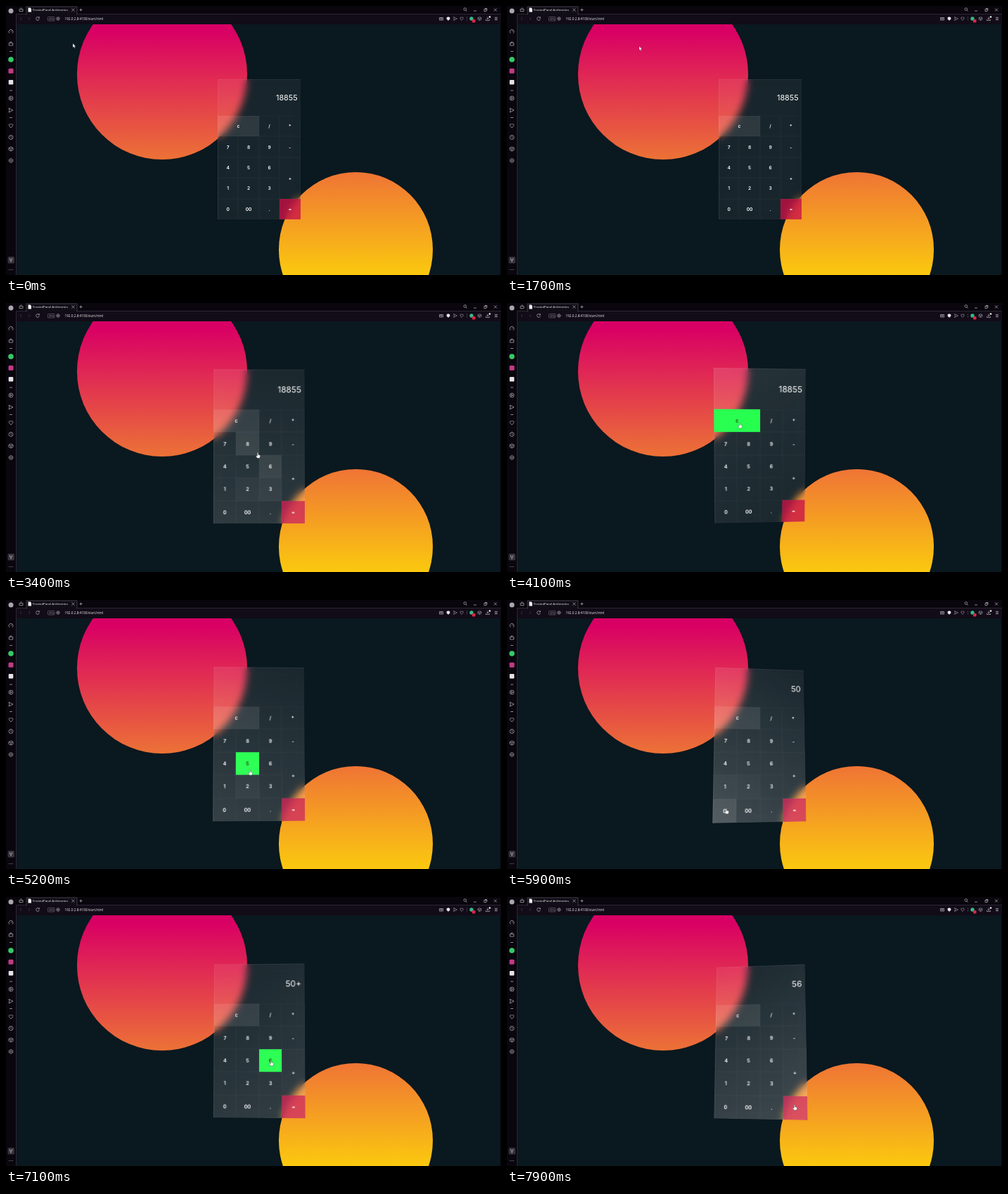
An HTML page for the animation above (8000 ms loop, 704x382 px).

```html
<!DOCTYPE html>
<html lang="en">
<head>
<meta charset="utf-8">
<title>Frosted glass keypad</title>
<style>
html, body { margin: 0; width: 100%; height: 100%; overflow: hidden; background: #09060d; }
body { position: relative; }
.page { position: absolute; left: 15px; top: 26px; width: 688px; height: 355.5px; background: #0a181f; overflow: hidden; }
.disc { position: absolute; border-radius: 50%; }
.pink { left: 86px; top: -50px; width: 241.6px; height: 241.6px; background: linear-gradient(#d60068, #d90064 25%, #ec7236); }
.gold { left: 372.8px; top: 210.2px; width: 219.5px; height: 219.5px; background: linear-gradient(#ef7435, #fbcb0e 68%, #ffec00); }
svg { position: absolute; left: 0; top: 0; }
.panel {
  position: absolute; left: 300.5px; top: 104.4px; width: 117.6px; height: 199px; overflow: hidden;
  background: rgba(255,255,255,.06); backdrop-filter: blur(5.4px);
  box-shadow: inset .5px .5px 0 rgba(255,255,255,.12);
  font-family: Inter, sans-serif; color: #fff;
}
.display { position: absolute; right: 4px; top: .8px; height: 52px; line-height: 52px; font-size: 10.8px; }
.key {
  position: absolute; box-sizing: border-box; padding-top: 1px;
  display: flex; align-items: center; justify-content: center;
  font-size: 6.6px; font-weight: 600; box-shadow: inset 0 0 0 .5px rgba(255,255,255,.045);
}
.glare {
  position: absolute; left: 50%; top: 50%; width: 236px; height: 236px; margin: -118px;
  background: linear-gradient(0deg, rgba(255,255,255,0), #fff);
}
</style>
</head>
<body>
<div class="page"><div class="disc pink"></div><div class="disc gold"></div></div>

<svg width="704" height="382" font-family="Open Sans, sans-serif">
  <path d="M15 12H704V26H15Z" fill="#110c17"/>
  <path d="M14.500 382V11.500H704" fill="none" stroke="#2c2633"/>
  <path d="M29 12.500V1H101V12.500" fill="#120e18" stroke="#55505c" stroke-width=".7"/>
  <path d="M31.500 2.500h3l1.500 1.500v4.500h-4.500Z" fill="#eee"/>
  <text x="38" y="7.200" font-size="4.300" fill="#eee">FrostedPanel Arithmetics</text>
  <rect x="59.500" y="15.500" width="9.500" height="5.500" rx="1" fill="none" stroke="#77727d" stroke-width=".6"/>
  <text x="61" y="19.700" font-size="3.500" fill="#a09ba6">VPN</text>
  <text x="83.500" y="19.900" font-size="4.700" fill="#eee">192.0.2.8:4100/start.html</text>
  <circle cx="7" cy="7" r="3.500" fill="#aaa6ae"/>
  <circle cx="7" cy="76" r="3.800" fill="#35c968"/>
  <rect x="3.500" y="88.700" width="7" height="7" rx="1.500" fill="#c23a86"/>
  <rect x="3.700" y="105" width="6.600" height="6.600" rx="1" fill="#e4e2e6"/>
  <rect x="2.500" y="356" width="9.500" height="9.500" rx="1.500" fill="#37323c"/>
  <path d="M629 15.300 631.300 16.200V18.700L629 20.800 626.700 18.700V16.200Z" fill="#e8e6ea"/>
  <circle cx="662" cy="18" r="2.700" fill="#35b98a"/>
  <rect x="663" y="19" width="4.500" height="4.500" rx="1" fill="#dc2747"/>
  <circle cx="688" cy="15.500" r="1.300" fill="#eee"/>
  <g id="icons" fill="none" stroke="#b0abb5" stroke-width=".75"/>
</svg>

<div class="panel" id="panel"><div class="display" id="display"></div></div>

<svg width="704" height="382">
  <g id="arrow"><path d="M0 0V6L1.400 4.800 2.300 7 3.300 6.600 2.400 4.500H4.200Z" fill="#fff" stroke="#111" stroke-width=".3"/></g>
  <g id="hand"><path d="M-.7.600Q0-.5.700.600V3L3 3.600Q3.700 4 3.500 5L2.800 7.800H-.8L-2.700 4.800Q-2.400 3.700-.7 5Z" fill="#fff" stroke="#222" stroke-width=".35"/></g>
</svg>

<script>
const $ = id => document.getElementById(id);

// Browser icons, drawn around their centres
const ring = "M-3 0a3 3 0 1 0 6 0a3 3 0 1 0-6 0";
const heart = "M0 3C-5-1-2-4 0-1.600 2-4 5-1 0 3Z";
const send = "M-3-3 3 0-3 3-2 0Z";
const cube = "M0-3 3-1.500V1.500L0 3-3 1.500V-1.500ZM-3-1.500 0 0 3-1.500M0 0V3";
const dash = "M-2 0H2";
const cross = "M-2-2 2 2M2-2-2 2";
const lens = "M-2-.5a1.800 1.800 0 1 0 3.600 0a1.800 1.800 0 1 0-3.600 0M1.200 1.200 2.700 2.700";
const icons = [
  [21.5, 5.5, "M-2.500-1H2.500V2H-2.500ZM-1-2.500H1"],
  [95.5, 5.5, cross], [106.5, 5.5, "M-2 0H2M0-2V2"],
  [653, 5, lens], [667, 7, dash], [682, 5.5, "M-2-1H1V2H-2ZM-1-2H2V1"], [696, 5.5, cross],
  [21, 18, "M1-2-1 0 1 2", .3], [33, 18, "M-1-2 1 0-1 2", .3],
  [45, 18, "M2-1.500A2.400 2.400 0 1 0 2.400.500M2.400-2.700V-1H.700"],
  [74, 18, ring + "M-3 0H3M0-3V3", 1, .75],
  [619, 18, "M-2.500-1.500H2.500V2H-2.500ZM-1 0a1 1 0 1 0 2 0a1 1 0 1 0-2 0"],
  [639, 18, send, 1, .8], [648, 18, heart, 1, .8], [655.5, 18, "M0-3V3", .3],
  [673.5, 18, cube, 1, .8], [685, 18, "M0-2.500V1M-1.500-.5 0 1 1.500-.5M-2.500 1V2.500H2.500V1"],
  [697, 18, "M-2-1.700H2M-2 0H2M-2 1.700H2"],
  [7, 36.5, "M-2 2.200A3 3 0 1 1 2 2.200M0 0 1.500-1.500"],
  [7, 53.5, "M-2.700-1H2.700V2.500H-2.700ZM-1-1V-2.500H1.500"],
  [7, 64.5, dash], [7, 120, dash], [7, 158.5, dash],
  [7, 131, ring + "M-1-1.500 1.500 0-1 1.500Z"],
  [7, 148, send], [7, 170, heart], [7, 186.5, ring + "M0-2V0L1.300 1"], [7, 203, cube],
  [7, 219.5, "M0-3 2.600-1.500V1.500L0 3-2.600 1.500V-1.500ZM-1 0a1 1 0 1 0 2 0a1 1 0 1 0-2 0"],
  [7, 360.5, "M-1.500-2.500V0H1.500V-2.500M0 0V2.500M-1 2.500H1"],
  [7, 374.5, "M-2.800 0h1M-.5 0h1M1.800 0h1"]
];
$("icons").innerHTML = icons.map(([x, y, d, o = 1, s = 1]) =>
  `<path transform="translate(${x} ${y}) scale(${s})" opacity="${o}" d="${d}"/>`).join("");

// Keypad: repeated characters form one wide or tall key
const rows = ["cc/*", "789-", "456+", "123+", "0Z.="];
const cell = 29.4, top0 = 52;
const base = { c: "rgba(255,255,255,.09)", "=": "rgba(200,15,70,.78)" };
const keys = {};
rows.forEach((row, r) => [...row].forEach((ch, c) => {
  const el = keys[ch];
  if (el) {
    if (row[c - 1] === ch) el.style.width = 2 * cell + "px";
    else el.style.height = 2 * cell + "px";
    return;
  }
  const key = keys[ch] = document.createElement("div");
  key.className = "key";
  key.textContent = ch === "Z" ? "00" : ch;
  key.style.cssText = `left:${c * cell}px;top:${top0 + r * cell}px;width:${cell}px;height:${cell}px`;
  $("panel").append(key);
}));
const glare = document.createElement("div");
glare.className = "glare";
$("panel").append(glare);

const LOOP = 8000, ENTER = 2200;
// Pointer stops: time, x, y
const path = [
  [0, 95, 53], [100, 95, 53], [800, 272, 237], [1100, 272, 237], [1400, 188, 57], [1700, 188, 57],
  [2200, 300, 195], [2600, 317.5, 262], [2800, 318, 262], [3200, 374, 250], [3600, 342, 175], [4000, 331, 170],
  [4300, 331, 170], [4700, 350, 262], [5100, 347, 241], [5300, 347, 241], [5700, 312, 296],
  [5900, 312, 296], [6300, 403, 247], [6600, 395, 245], [7000, 377, 232], [7200, 377, 232],
  [7600, 409, 295], [LOOP, 409, 295]
];
// Press time, key, display after release
const presses = [[4100, "c", ""], [5200, "5", "5"], [5800, "0", "50"], [6400, "+", "50+"], [7100, "6", "50+6"], [7700, "=", "56"]];

const clamp = v => Math.min(1, Math.max(0, v));
const smooth = v => v * v * (3 - 2 * v);

function pointer(t) {
  const i = path.findIndex(p => p[0] > t);
  const [t0, x0, y0] = path[i - 1], [t1, x1, y1] = path[i];
  const k = smooth((t - t0) / (t1 - t0));
  return [x0 + (x1 - x0) * k, y0 + (y1 - y0) * k];
}
function place(t) {
  const [x, y] = pointer(t);
  return [clamp((x - 294) / 131), clamp((y - 94.5) / 219)];
}
function keyAt(t) {
  if (t < ENTER) return;
  const [u, v] = place(t);
  return rows[Math.floor((v * 199 - top0) / cell)]?.[Math.floor(u * 4)];
}

function draw(t) {
  const [x, y] = pointer(t), [u, v] = place(t);
  const inside = t >= ENTER, e = smooth(clamp((t - ENTER) / 400));
  $("panel").style.transform =
    `perspective(370px) rotateX(${(2 * v - 1) * 7 * e}deg) rotateY(${(1 - 2 * u) * 7 * e}deg) scale(${1 + .1 * e})`;
  glare.style.transform = `rotate(${Math.atan2((u - .5) * 131, (.5 - v) * 219)}rad)`;
  glare.style.opacity = v * .18 * e;

  // Hover light fades for half a second after the pointer leaves
  const glow = {};
  for (let dt = 0; dt < 500; dt += 50) {
    const ch = keyAt(t - dt);
    if (ch && ch !== "=") glow[ch] ??= 1 - dt / 500;
  }
  const down = presses.find(p => t >= p[0] && t < p[0] + 100)?.[1];
  for (const ch in keys) {
    const light = `rgba(255,255,255,${.1 * (glow[ch] || 0)})`;
    keys[ch].style.background = ch === down ? "#1eff48" : `linear-gradient(${light},${light}) ${base[ch] || "transparent"}`;
    keys[ch].style.color = ch === down ? "#192f00" : "#fff";
  }
  $("display").textContent = presses.reduce((s, p) => t >= p[0] + 100 ? p[2] : s, "18855");

  for (const id of ["arrow", "hand"]) {
    $(id).setAttribute("transform", `translate(${x} ${y})`);
    $(id).style.display = (id === "hand") === inside ? "" : "none";
  }
}

function frame() {
  draw(Math.floor(performance.now() % LOOP / 100) * 100);
  requestAnimationFrame(frame);
}
frame();
</script>
</body>
</html>
```
